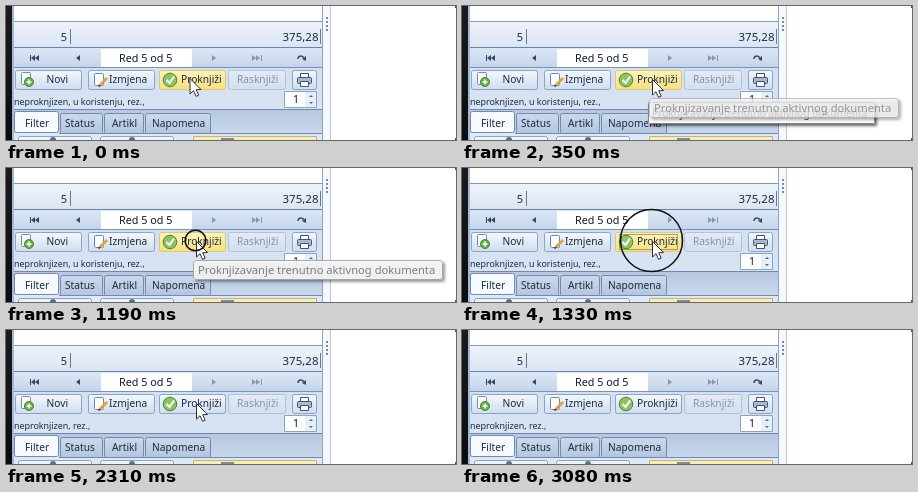
Animation, 450 px wide and 134 px high, one loop 4.27 s. Source, as an HTML page with a canvas:

```html
<!DOCTYPE html>
<html lang="hr">
<head>
<meta charset="utf-8">
<title>Proknjižavanje dokumenta</title>
<style>
html, body { margin: 0; width: 100%; height: 100%; overflow: hidden; background: #fff; }
canvas { display: block; width: 450px; height: 134px; }
</style>
</head>
<body>
<canvas id="stage" width="450" height="134"></canvas>
<script>
const LOOP = 4270, STEP = 70;
const LEFT = 8, WIDTH = 308;
const ctx = document.getElementById('stage').getContext('2d');
const INK = '#1d2b40', EDGE = '#8ba4c6';

function rect(x, y, w, h, color) {
  ctx.fillStyle = color;
  ctx.fillRect(x, y, w, h);
}

function fade(y, h, top, bottom) {
  const g = ctx.createLinearGradient(0, y, 0, y + h);
  g.addColorStop(0, top);
  g.addColorStop(1, bottom);
  return g;
}

function panel(x, y, w, h, fill, stroke, radius = 2) {
  ctx.beginPath();
  ctx.roundRect(x + .5, y + .5, w - 1, h - 1, radius);
  ctx.fillStyle = fill;
  ctx.fill();
  ctx.lineWidth = 1;
  ctx.strokeStyle = stroke;
  ctx.stroke();
}

function text(str, x, baseline, size = 10.2, color = INK, align = 'left') {
  ctx.font = `${size}px "Noto Sans", "Open Sans", sans-serif`;
  ctx.textAlign = align;
  ctx.fillStyle = color;
  ctx.fillText(str, x, baseline);
}

function shape(points, fill, stroke) {
  ctx.beginPath();
  points.forEach(([x, y]) => ctx.lineTo(x, y));
  ctx.closePath();
  ctx.fillStyle = fill;
  ctx.fill();
  if (stroke) { ctx.strokeStyle = stroke; ctx.lineWidth = 1; ctx.stroke(); }
}

function line(points, color, width = 1) {
  ctx.beginPath();
  points.forEach(([x, y]) => ctx.lineTo(x, y));
  ctx.strokeStyle = color;
  ctx.lineWidth = width;
  ctx.stroke();
}

function disc(x, y, r, fill, stroke) {
  ctx.beginPath();
  ctx.arc(x, y, r, 0, 7);
  ctx.fillStyle = fill;
  ctx.fill();
  if (stroke) { ctx.strokeStyle = stroke; ctx.lineWidth = 1; ctx.stroke(); }
}

// dir: 1 points right, -1 points left
function arrow(x, y, dir, color) {
  shape([[x - 2 * dir, y - 3], [x + 2 * dir, y], [x - 2 * dir, y + 3]], color);
}

function grid() {
  rect(0, 0, 450, 134, '#fff');
  rect(0, 0, 6, 134, fade(0, 134, '#1b1b1d', '#0b0c10'));
  rect(6, 0, 2, 134, '#a3b8d4');
  rect(LEFT, 15, WIDTH, 1, '#7e98bd');
  rect(LEFT, 16, WIDTH, 25, fade(16, 25, '#eef3fa', '#dbe5f2'));
  rect(64, 23, 1, 15, '#5f7ba5');
  rect(314, 23, 1, 15, '#5f7ba5');
  text('5', 61, 35, 11, INK, 'right');
  text('375,28', 312.5, 35, 11.5, INK, 'right');
  rect(LEFT, 41, WIDTH, 1, '#6683ad');
}

function recordBar() {
  rect(LEFT, 42, WIDTH, 20, fade(42, 20, '#dce7f4', '#c3d4e9'));
  rect(95, 43, 91, 18, '#fff');
  text('Red 5 od 5', 113, 56, 10.8, '#111a28');
  const dark = '#34496a', dim = '#8798b1';
  rect(24, 49, 1, 6, dark);
  arrow(27, 52, -1, dark);
  arrow(31, 52, -1, dark);
  arrow(72, 52, -1, dark);
  arrow(208, 52, 1, dim);
  arrow(248, 52, 1, dim);
  arrow(252, 52, 1, dim);
  rect(255, 49, 1, 6, dim);
  ctx.beginPath();
  ctx.arc(295, 53, 3, Math.PI, 6);
  ctx.strokeStyle = dark;
  ctx.lineWidth = 1.4;
  ctx.stroke();
  shape([[296, 53], [300, 50], [300, 55]], dark);
  rect(LEFT, 61, WIDTH, 1, '#7892b8');
}

function button(x, w, fill = fade(64, 20, '#f4f8fd', '#cfddee'), edge = EDGE) {
  panel(x, 64, w, 20, fill, edge);
}

function toolbar(state) {
  rect(LEFT, 62, WIDTH, 42, fade(62, 42, '#d3e0f0', '#d9e4f2'));
  button(9, 67);
  panel(15, 66, 10, 13, '#f7fafc', '#7c8da3', 1);
  disc(23, 76, 4.5, '#6cb048', '#3f8730');
  rect(20.5, 75.3, 5, 1.5, '#fff');
  rect(22.3, 73.5, 1.5, 5, '#fff');
  text('Novi', 40.5, 77);

  button(82, 67);
  panel(88, 67, 10, 13, '#fff', '#6888b4', 1);
  line([[94, 79], [101, 72]], '#e0a13a', 2.6);
  line([[92.5, 80.5], [94, 79]], '#5a4a35', 2);
  text('Izmjena', 103, 77);

  const hot = fade(64, 20, '#fdf3bd', '#f7df7d');
  if (state === 'idle') button(153, 67);
  else button(153, 67, hot, '#dcc878');
  disc(164, 74, 6.8, '#8cc463', '#46882b');
  line([[160.5, 74], [163.5, 77], [168, 70.5]], '#fff', 2);
  text('Proknjiži', 175, 77);
  if (state === 'pressed') {
    ctx.save();
    ctx.setLineDash([1, 1]);
    ctx.strokeStyle = '#5d5432';
    ctx.lineWidth = 1;
    ctx.strokeRect(157.5, 66.5, 58, 15);
    ctx.restore();
  }

  button(222, 58, fade(64, 20, '#e3ebf5', '#d2deed'), '#b1c2d9');
  text('Rasknjiži', 231, 77, 10.2, '#8795aa');

  button(286, 25);
  panel(294, 67, 9, 6, '#fff', '#40536f', 0);
  panel(291, 71, 15, 7, '#a9b9ce', '#40536f', 1);
  panel(294, 75, 9, 6, '#fff', '#40536f', 0);
}

function statusRow(inUse) {
  text(`neproknjizen,${inUse ? ' u koristenju,' : ''} rez.,`, 8, 99, 8.9);
  panel(278, 85, 33, 17, '#fff', EDGE, 0);
  rect(299, 86, 11, 15, '#e6eef8');
  text('1', 290, 97, 10.5, '#111a28', 'center');
  shape([[303, 91], [305, 89], [307, 91]], '#4e6486');
  shape([[303, 96], [305, 98], [307, 96]], '#4e6486');
}

function tabs() {
  rect(LEFT, 103, WIDTH, 24, fade(103, 24, '#b4c7e0', '#c8d7eb'));
  rect(LEFT, 103, WIDTH, 1, '#6e89b1');
  const items = [['Filter', 8, 45, 19], ['Status', 54, 43, 59],
    ['Artikl', 98, 40, 106], ['Napomena', 139, 66, 146]];
  items.forEach(([label, x, w, textX], i) => {
    const fill = i ? fade(107, 20, '#ccd9ea', '#b4c6de') : '#f6f9fd';
    panel(x, i ? 107 : 105, w, 22, fill, '#718bb0');
    text(label, textX, 121);
  });
  rect(LEFT, 127, WIDTH, 7, '#dfe9f5');
  rect(53, 127, 263, 1, '#718bb0');
  for (const x of [12, 94]) panel(x, 130, 74, 8, '#edf3fa', EDGE);
  disc(47, 134, 3, '#5d7188');
  disc(126, 134, 3, '#5d7188');
  panel(187, 130, 124, 8, '#fbeeb0', '#b9b48c', 0);
  rect(215, 132, 13, 2, '#7f8a97');
}

function splitter() {
  rect(316, 0, 1, 134, EDGE);
  rect(317, 0, 7, 134, '#f5f8fc');
  rect(324, 0, 1, 134, '#b9c8dc');
  for (let y = 11; y < 26; y += 4) rect(320, y, 2, 2, '#6d88b1');
  rect(449, 0, 1, 2, '#555');
  rect(449, 132, 1, 2, '#555');
}

function tooltip({ x, y, w, h, textX, size, radius }, alpha) {
  ctx.save();
  ctx.globalAlpha = alpha;
  ctx.shadowColor = 'rgba(0,0,0,.6)';
  ctx.shadowBlur = 3;
  ctx.shadowOffsetX = ctx.shadowOffsetY = 2;
  ctx.beginPath();
  ctx.roundRect(x, y, w, h, radius);
  ctx.fillStyle = '#fff';
  ctx.fill();
  ctx.shadowColor = 'transparent';
  panel(x, y, w, h, '#fdfdfe', '#858585', radius);
  text('Proknjizavanje trenutno aktivnog dokumenta', textX, y + h / 2 + size * .36, size, '#454550');
  ctx.restore();
}

const hint = { x: 186, y: 96, w: 227, h: 22, textX: 190, size: 10.17, radius: 1 };
const callout = { x: 187, y: 92, w: 250, h: 20, textX: 192, size: 11.2, radius: 3 };

function pointer(x, y) {
  ctx.save();
  ctx.translate(x, y);
  shape([[.5, .5], [.5, 16], [4, 12.7], [6.6, 18.4], [9.2, 17.2], [6.7, 11.7], [11.5, 11.5]],
    '#fff', '#303030');
  ctx.restore();
}

// [time, x, y]; the pointer leaves the stage after the last entry
const path = [[0, 183.5, 72], [70, 187, 72], [140, 190, 73], [2800, 194, 83],
  [2870, 201, 96], [2940, 209, 109], [3010, 217, 121]];

const clamp = v => Math.min(1, Math.max(0, v));

function draw(t) {
  grid();
  recordBar();
  toolbar(t < 1260 ? 'hover' : t < 2100 ? 'pressed' : 'idle');
  statusRow(t < 2240);
  tabs();
  splitter();

  if (t >= 140 && t < 1190) tooltip(hint, t < 210 ? .6 : 1);
  const shown = clamp((t - 210) / 280) * clamp((1330 - t) / 210);
  if (shown) tooltip(callout, shown);

  if (t < 3080) {
    const [, x, y] = path.findLast(([at]) => at <= t);
    pointer(x, y);
  }
  const ring = 31 * (1 - Math.abs(t - 1330) / 210);
  if (ring > 1) {
    ctx.beginPath();
    ctx.arc(189.5, 72.5, ring, 0, 7);
    ctx.strokeStyle = '#111';
    ctx.lineWidth = 1.5;
    ctx.stroke();
  }
}

const start = performance.now();
function tick() {
  const t = (performance.now() - start) % LOOP;
  draw(Math.floor(t / STEP) * STEP);
  requestAnimationFrame(tick);
}
tick();
</script>
</body>
</html>
```
